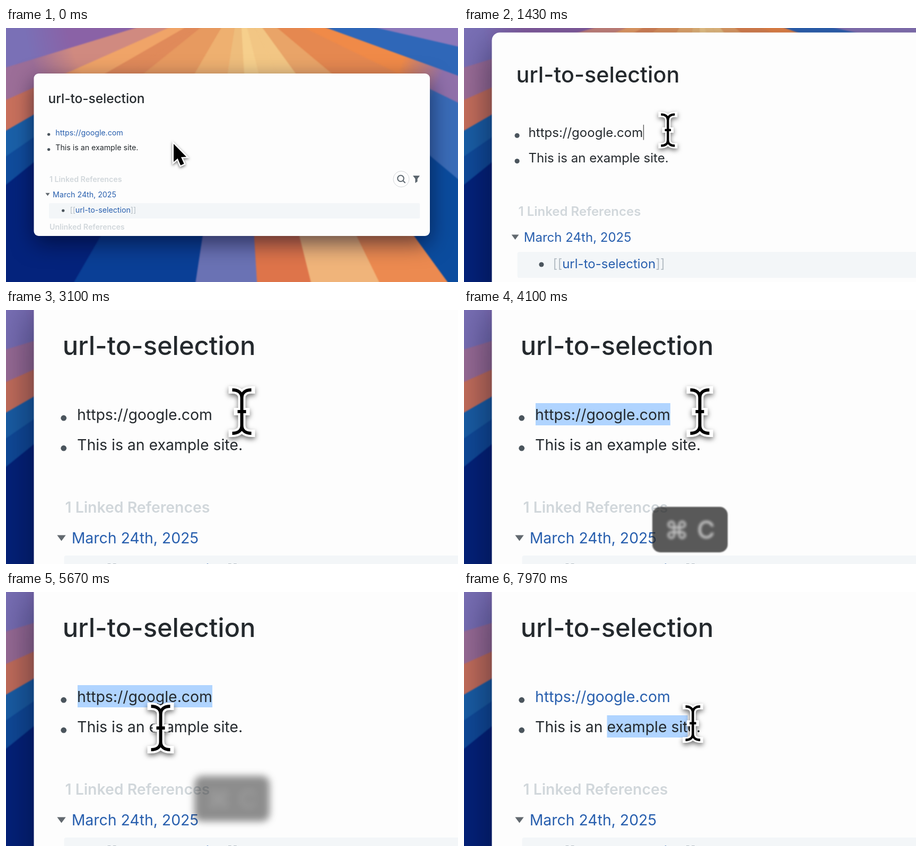
An HTML page with a canvas that plays this animation: 852 by 480 pixels, repeating every 8 s.

```html
<!DOCTYPE html>
<html lang="en">
<head>
<meta charset="utf-8">
<title>url-to-selection</title>
<style>
html, body { margin: 0; width: 100%; height: 100%; overflow: hidden; background: #0b3c96; }
canvas { display: block; width: 852px; height: 480px; }
</style>
</head>
<body>
<canvas id="stage" width="852" height="480"></canvas>
<script>
const W = 852, H = 480, LOOP = 8000;
const ctx = document.getElementById('stage').getContext('2d');
const FAMILY = 'Inter, "DejaVu Sans", sans-serif';
const BODY = '400 14.2px ' + FAMILY;
const HEAD = '600 14.2px ' + FAMILY;
const TITLE = '500 24.4px ' + FAMILY;
const KEYS = '500 46px ' + FAMILY;
const BLUE = '#285fae', INK = '#24292d', GREY = '#d1d7db', BRACKET = '#b4bdc4', PICK = '#b0d4ff';

const PIVOT = { x: 52.5, y: 198 };
const PAGE_TITLE = 'url-to-selection', URL_TEXT = 'https://google.com', SITE_TEXT = 'This is an example site.';
const TEXT_X = 93.3, HEAD_X = 82, ROW_H = 28.5;
const rowY = i => 202.8 + ROW_H * i;

// Times of the main events, in ms
const CLICK = 1300, SELECT = 3250, COPY = 3990, PRESS = 6350;

const clamp = v => Math.max(0, Math.min(1, v));
const span = (t, a, b) => clamp((t - a) / (b - a));
const smooth = p => p * p * (3 - 2 * p);
const easeOut = p => 1 - Math.pow(1 - p, 3);
const mix = (a, b, p) => a + (b - a) * p;

// End angle of each ray, its colour near the hub and far from it
const RAYS = [
  [13, '#8c78ba', '#8c78ba'],
  [20, '#2f67b8', '#2f67b8'],
  [26, '#f08a48', '#9070aa'],
  [40, '#e58850', '#3a6cb8'],
  [54, '#e9a468', '#0b4c9e'],
  [64, '#f2c684', '#ec8a50'],
  [76, '#f2c684', '#f0b47a'],
  [86.5, '#f6cf8c', '#de744a'],
  [98.7, '#eebd7c', '#6a72b4'],
  [120, '#eeb070', '#0a3f96'],
  [141, '#e79a60', '#04237c'],
  [145.5, '#e08a5a', '#104c9c'],
  [150, '#e08a5a', '#1a60a8'],
  [156, '#f0a468', '#c8705c'],
  [163, '#d08a80', '#9c6e98'],
  [181, '#8a62a6', '#7a70b6']
];

// Rays of colour fan out from a hub above the stage
function makeBackdrop() {
  const cv = document.createElement('canvas');
  cv.width = W;
  cv.height = H;
  const c = cv.getContext('2d');
  c.translate(440, -60);
  c.filter = 'blur(1.2px)';
  let from = -1;
  for (const [to, near, far] of RAYS) {
    const g = c.createRadialGradient(0, 0, 330, 0, 0, 410);
    g.addColorStop(0, near);
    g.addColorStop(1, far);
    c.fillStyle = g;
    c.beginPath();
    c.moveTo(0, 0);
    c.arc(0, 0, 900, from * Math.PI / 180, (to + 1) * Math.PI / 180);
    c.fill();
    from = to;
  }
  return cv;
}
const backdrop = makeBackdrop();

function text(str, x, y, color, font = BODY) {
  ctx.font = font;
  ctx.fillStyle = color;
  ctx.fillText(str, x, y);
  return x + ctx.measureText(str).width;
}

function textWidth(str) {
  ctx.font = BODY;
  return ctx.measureText(str).width;
}

function box(x, y, w, h, r, color) {
  ctx.fillStyle = color;
  ctx.beginPath();
  ctx.roundRect(x, y, w, h, r);
  ctx.fill();
}

function bullet(x, baseline) {
  box(x - 2.7, baseline - 7, 5.4, 5.4, 2.7, '#4b555d');
}

function polygon(points, color) {
  ctx.fillStyle = color;
  ctx.beginPath();
  for (const [x, y] of points) ctx.lineTo(x, y);
  ctx.closePath();
  ctx.fill();
}

function shadow(color, blur, dy) {
  ctx.shadowColor = color;
  ctx.shadowBlur = blur;
  ctx.shadowOffsetY = dy;
}

// Critically damped spring from 1x to 2x
function zoomAt(t) {
  const x = Math.max(0, t - 1052) * 0.00635;
  return 2 - (1 + x) * Math.exp(-x);
}

const MOVES = [
  { from: 430, to: 1050, x: 248.5, y: 195 },
  { from: 4670, to: 5600, x: 172, y: 227.5 },
  { from: 5700, to: 6150, x: 163, y: 225 },
  { from: 6700, to: 7990, x: 242, y: 223 }
];

function pointerAt(t) {
  let x = 316, y = 219;
  for (const m of MOVES) {
    const p = smooth(span(t, m.from, m.to));
    x = mix(x, m.x, p);
    y = mix(y, m.y, p);
  }
  const press = span(t, CLICK - 60, CLICK + 40) - span(t, CLICK + 70, CLICK + 240) + span(t, PRESS - 20, PRESS + 100);
  return { x, y, size: 1 - 0.23 * press, arrow: t < 700 };
}

// White outline with a shadow; the black part follows on top
function outline(path, width) {
  ctx.lineWidth = width;
  ctx.strokeStyle = '#fff';
  ctx.stroke(path);
  shadow('transparent', 0, 0);
}

function drawArrow() {
  const path = new Path2D('M0 0V34L7.6 27.5 13.2 40.5 19.6 37.6 14 25 24 24.4Z');
  outline(path, 5);
  ctx.fillStyle = '#000';
  ctx.fill(path);
}

function drawBeam() {
  ctx.scale(0.5, 0.5);
  const path = new Path2D('M-8 0H8');
  for (const side of [-1, 1]) {
    path.moveTo(18 * side, -41);
    path.bezierCurveTo(7 * side, -41, 0, -36, 0, -26);
    path.lineTo(0, 26);
    path.bezierCurveTo(0, 36, 7 * side, 41, 18 * side, 41);
  }
  ctx.lineCap = 'square';
  outline(path, 14);
  ctx.lineCap = 'butt';
  ctx.lineWidth = 6;
  ctx.strokeStyle = '#000';
  ctx.stroke(path);
}

function drawPointer(p, zoom) {
  ctx.save();
  ctx.translate(p.x, p.y);
  ctx.scale(p.size, p.size);
  shadow('rgba(0,0,0,.55)', 5 * zoom, 2 * zoom);
  if (p.arrow) drawArrow(); else drawBeam();
  ctx.restore();
}

function drawTools() {
  ctx.strokeStyle = '#d3d6d9';
  ctx.lineWidth = 1;
  ctx.beginPath();
  ctx.arc(745, 285.5, 15, 0, 7);
  ctx.stroke();
  ctx.strokeStyle = '#5c666e';
  ctx.lineWidth = 2;
  ctx.stroke(new Path2D('M748.4 288.7l4.2 4.1M749.8 284.3a5.8 5.8 0 1 0 -11.6 0a5.8 5.8 0 1 0 11.6 0'));
  ctx.fillStyle = '#5c666e';
  ctx.fill(new Path2D('M767 279h13l-4.4 6v5l-4.2 3v-8z'));
}

// Last letter edge the pointer has passed
function dragEnd(x) {
  let end = TEXT_X;
  for (let i = 1; i <= SITE_TEXT.length; i++) {
    const edge = TEXT_X + textWidth(SITE_TEXT.slice(0, i));
    if (edge > x) break;
    end = edge;
  }
  return end;
}

function drawPick(row, x, end) {
  box(x, rowY(row) - 15.8, end - x, 21, 0, PICK);
}

function drawCaret(row, x) {
  box(x + 0.3, rowY(row) - 13.8, 0.8, 17, 0, '#555');
}

function drawMarks(t, p) {
  const urlEnd = TEXT_X + textWidth(URL_TEXT);
  if (t >= PRESS) {
    const start = TEXT_X + textWidth('This is an ');
    const end = dragEnd(p.x);
    if (end > start) drawPick(1, start, end); else drawCaret(1, start);
  } else if (t >= SELECT) {
    drawPick(0, TEXT_X + 0.4, urlEnd);
  } else if (t >= CLICK && Math.floor((t - CLICK) / 500) % 2 === 0) {
    drawCaret(0, urlEnd);
  }
}

function drawWindow(t, zoom, p) {
  ctx.save();
  shadow('rgba(0,5,35,.6)', 42 * zoom, 14 * zoom);
  box(PIVOT.x, 86, 746.5, 307, 9, '#fdfdfd');
  ctx.restore();

  text(PAGE_TITLE, 79.6, 141.6, INK, TITLE);
  drawMarks(t, p);
  const editing = t >= CLICK && t < PRESS;
  [URL_TEXT, SITE_TEXT].forEach((line, i) => {
    bullet(80.6, rowY(i) + 2.6);
    text(line, TEXT_X, rowY(i), i || editing ? INK : BLUE);
  });

  text('1 Linked References', HEAD_X, 290.6, GREY, HEAD);
  drawTools();
  polygon([[74.4, 311.7], [82.6, 311.7], [78.5, 317.3]], '#62696f');
  text('March 24th, 2025', 88.1, 319.6, BLUE);
  box(81, 331, 699, 29, 2, '#f3f6f8');
  bullet(107.7, 349.4);
  const open = text('[[', 120.5, 349.4, BRACKET);
  const close = text(PAGE_TITLE, open, 349.4, BLUE);
  text(']]', close, 349.4, BRACKET);
  text('Unlinked References', HEAD_X, 380.5, GREY, HEAD);
}

function drawBadge(t) {
  const enter = easeOut(span(t, 3180, 3680));
  const exit = span(t, 5500, 5850);
  if (enter === 0 || exit === 1) return;
  const copying = t >= COPY;
  const swap = copying ? span(t, COPY, COPY + 250) : 1;
  const blur = 10 * (1 - enter) + 14 * exit + 1.6 * (1 - swap);
  const alpha = enter * (1 - Math.pow(exit, 1.6));
  const soften = b => { ctx.filter = b > 0.05 ? `blur(${b}px)` : 'none'; };
  ctx.save();
  ctx.translate(0, 60 * (1 - enter) - 50 * exit);
  ctx.globalAlpha = alpha;
  soften(blur);
  box(355, 372, 142, 86, 15, 'rgba(40,40,40,.77)');
  ctx.globalAlpha = alpha * Math.sqrt(swap) * Math.pow(1 - exit, 2);
  soften(blur + 3 * (1 - swap));
  ctx.textAlign = 'center';
  text('⌘', 401, 432, '#fff', KEYS);
  text(copying ? 'C' : 'A', 456, 432, '#fff', KEYS);
  ctx.restore();
}

function draw(t) {
  const zoom = zoomAt(t), p = pointerAt(t);
  ctx.drawImage(backdrop, 0, 0);
  ctx.save();
  ctx.translate(PIVOT.x, PIVOT.y);
  ctx.scale(zoom, zoom);
  ctx.translate(-PIVOT.x, -PIVOT.y);
  drawWindow(t, zoom, p);
  drawPointer(p, zoom);
  ctx.restore();
  drawBadge(t);
}

const began = performance.now();
function tick() {
  draw((performance.now() - began) % LOOP);
  requestAnimationFrame(tick);
}
tick();
</script>
</body>
</html>
```
